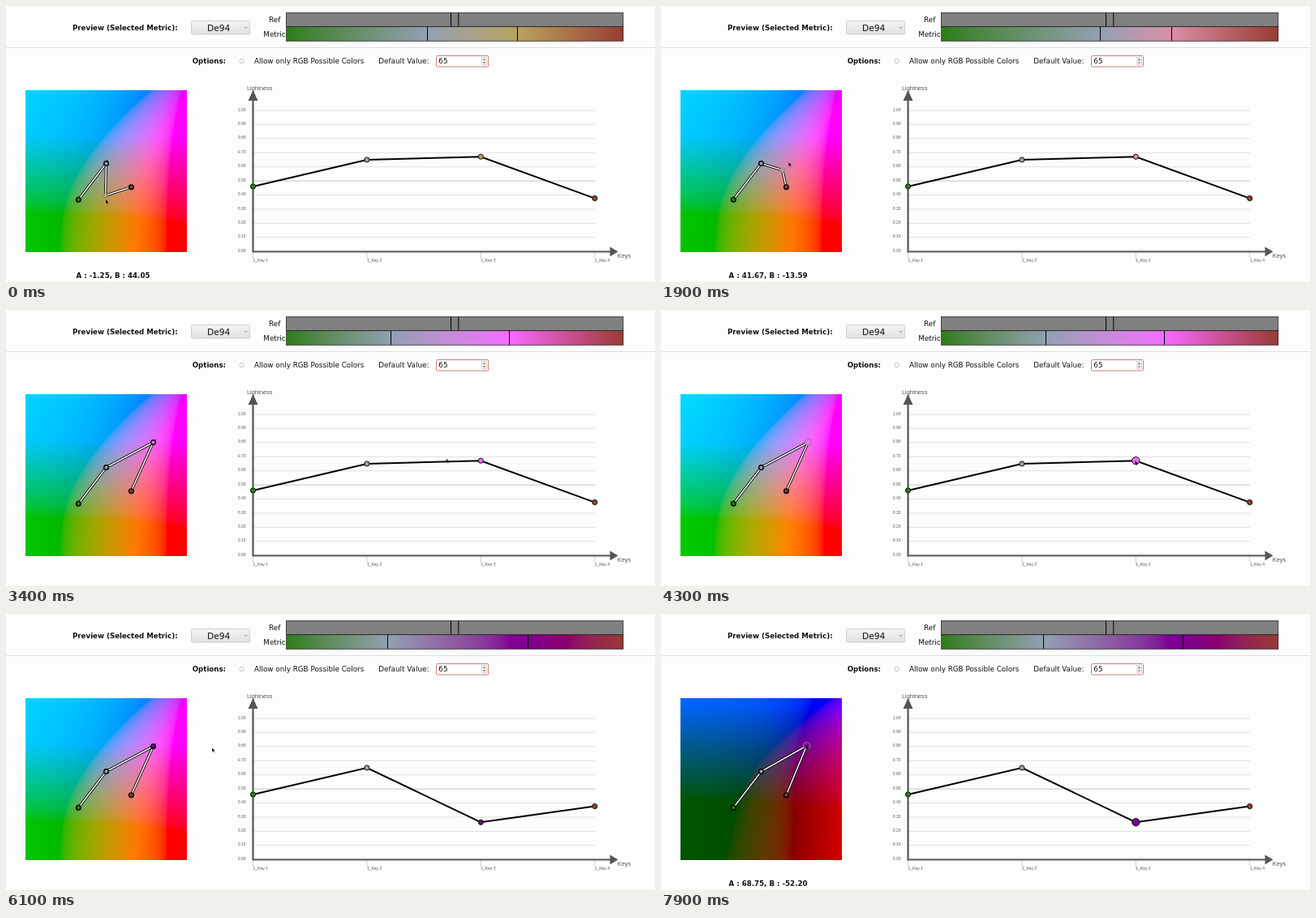
Write an HTML page with a canvas that moves like this. It is 800 px wide and 341 px high and loops after 8000 ms.

```html
<!DOCTYPE html>
<html lang="en">
<head>
<meta charset="utf-8">
<title>Colour path editor</title>
<style>
html, body { margin: 0; width: 100%; height: 100%; overflow: hidden; background: #fdfdfd; }
#stage { position: relative; width: 800px; height: 341px; overflow: hidden; }
canvas, svg { position: absolute; left: 0; top: 0; }
#plane { left: 24px; top: 104px; }
#bar { left: 346px; top: 26px; }
.ui { font: 8.8px "DejaVu Sans", sans-serif; fill: #111; }
.b { font: bold 8.67px "DejaVu Sans", sans-serif; fill: #111; }
.axis { font: 7.35px "Liberation Sans", Arial, sans-serif; fill: #555; }
.tick { font: 5px "Liberation Sans", Arial, sans-serif; fill: #555; }
</style>
</head>
<body>
<div id="stage">
  <canvas id="plane" width="199" height="200"></canvas>
  <canvas id="bar" width="415" height="17"></canvas>
  <svg width="800" height="341" viewBox="0 0 800 341">
    <defs>
      <linearGradient id="btn" x2="0" y2="1">
        <stop stop-color="#f4f4f4"/><stop offset="1" stop-color="#e0e0e0"/>
      </linearGradient>
    </defs>
    <path d="M0 51.5H800" stroke="#dcdcdc"/>
    <text class="b" x="82" y="30">Preview (Selected Metric):</text>
    <rect x="228.5" y="18.5" width="72" height="16.5" rx="1" fill="url(#btn)" stroke="#d0d0d0"/>
    <text class="ui" x="248" y="31" style="font-size:10.7px">De94</text>
    <path d="M293.8 25.8l1.8 1.7 1.8-1.7" fill="none" stroke="#666" stroke-width=".8"/>
    <text class="ui" x="324" y="20">Ref</text>
    <text class="ui" x="317.3" y="38">Metric</text>
    <rect x="345.5" y="8.3" width="415.3" height="17.2" fill="#808080" stroke="#222" stroke-width=".8"/>
    <path d="M548.5 8V25M557.8 8V25" stroke="#000"/>
    <rect x="345.5" y="25.5" width="415.3" height="17.8" fill="none" stroke="#222" stroke-width=".8"/>

    <text class="b" x="229.7" y="71.3">Options:</text>
    <rect x="288.3" y="65.8" width="4.6" height="4.6" rx="1" fill="#fff" stroke="#b5b5b5" stroke-width=".8"/>
    <text class="ui" x="306" y="71.3">Allow only RGB Possible Colors</text>
    <text class="ui" x="459.3" y="71.3">Default Value:</text>
    <rect x="530.5" y="61.5" width="64" height="13.5" rx="1" fill="#fff" stroke="#dc7b78"/>
    <text class="ui" x="533.3" y="71.3">65</text>
    <rect x="586.5" y="63.5" width="6" height="9.5" fill="#ececec" stroke="#ccc" stroke-width=".6"/>
    <path d="M588 67l1.5-1.7 1.5 1.7zM588 69.5l1.5 1.7 1.5-1.7z" fill="#666"/>

    <g id="grid"></g>
    <path d="M304.5 115V303.5H746" fill="none" stroke="#555" stroke-width="2.2"/>
    <path d="M304.5 104l6 13h-12zM754.5 303.5l-10-6v12z" fill="#555"/>
    <text class="axis" x="297" y="104">Lightness</text>
    <text class="axis" x="753.8" y="311">Keys</text>

    <g id="marks"></g>
    <g id="graph"></g>
    <g id="path"></g>
    <text id="readout" class="b" x="132" y="336.3" text-anchor="middle"></text>
    <path id="cursor" d="M0 0V4.6L1.1 3.7 1.9 5.4 2.7 5 2 3.4H3.4Z" fill="#000"/>
  </svg>
</div>
<script>
const LOOP = 8000, STEP = 100, LAG = 150, DEFAULT_L = 65;
const PLANE = { x: 24, w: 199, h: 200, cx: 124, cy: 204, unit: 1.25 };
const BAR = { x: 346, w: 415 };
const $ = id => document.getElementById(id);

// Pointer stops: time, x, y. Every leg eases in and out.
const STOPS = [
  [-150, 122.5, 234.3], [0, 123, 239.24], [1600, 146.3, 206.84],
  [2400, 181.5, 163.5], [2600, 183.7, 162.576], [3600, 584.5, 186.2],
  [4500, 584.5, 186.2], [5700, 586, 257.3], [6250, 180, 145],
  [6900, 178.3, 161.904], [7100, 181, 163], [7500, 181, 163], [7900, 179, 162.24]
];
const DROP = 2400, LIFT = [4500, 5700], REGRAB = 7500;

const clamp = (v, lo = 0, hi = 1) => Math.max(lo, Math.min(hi, v));
const mix = (a, b, k) => a.map((v, i) => v + (b[i] - v) * k);
const smooth = k => k * k * (3 - 2 * k);

function pointer(t) {
  const i = clamp(STOPS.findIndex(s => s[0] >= t), 1, STOPS.length - 1);
  const [a, b] = [STOPS[i - 1], STOPS[i]];
  return mix(a, b, smooth(clamp((t - a[0]) / (b[0] - a[0])))).slice(1);
}

// The dragged key trails the pointer.
function draggedSpot(t) {
  const [x, y] = pointer(Math.min(t - LAG, DROP));
  const from = pointer(REGRAB), to = pointer(Math.max(t, REGRAB));
  return [x + to[0] - from[0], y + to[1] - from[1]];
}
const lightY = l => 303.3 - l * 1.743;
const draggedLight = t => (303.3 - pointer(clamp(t - LAG, ...LIFT))[1]) / 1.743;

const invF = f => f > 6 / 29 ? f * f * f : (f - 16 / 116) / 7.787;
const gamma = v => 255 * (v <= .0031308 ? 12.92 * v : 1.055 * v ** (1 / 2.4) - .055);

function labToRgb([l, a, b]) {
  const fy = (l + 16) / 116;
  const x = .9505 * invF(fy + a / 500), y = invF(fy), z = 1.089 * invF(fy - b / 200);
  return [
    3.2406 * x - 1.5372 * y - .4986 * z,
    -.9689 * x + 1.8758 * y + .0415 * z,
    .0557 * x - .204 * y + 1.057 * z
  ].map(v => Math.round(gamma(clamp(v))));
}
const css = lab => `rgb(${labToRgb(lab)})`;
const toAB = (x, y) => [(x - PLANE.cx) * PLANE.unit, (y - PLANE.cy) * PLANE.unit];

// Colour difference with a hue term that weakens as chroma grows.
function distance([l1, a1, b1], [l2, a2, b2]) {
  const c1 = Math.hypot(a1, b1), c2 = Math.hypot(a2, b2), dc = c1 - c2;
  const hue = (a1 - a2) ** 2 + (b1 - b2) ** 2 - dc * dc;
  const weight = 1 + .0075 * Math.sqrt(c1 * c2);
  return Math.sqrt(2 * (l1 - l2) ** 2 + dc * dc + hue / weight ** 2);
}

function barStops(labs) {
  const sums = [0];
  for (let i = 1; i < labs.length; i++) sums.push(sums[i - 1] + distance(labs[i - 1], labs[i]));
  return sums.map(s => s / sums[sums.length - 1] * BAR.w);
}

const planeCtx = $('plane').getContext('2d');
let shownL = null;
function drawPlane(l) {
  if (l === shownL) return;
  shownL = l;
  const { w, h, x: left, cy } = PLANE, img = planeCtx.createImageData(w, h);
  for (let y = 0, p = 0; y < h; y++) {
    for (let x = 0; x < w; x++, p += 4) {
      img.data.set(labToRgb([l, ...toAB(left + x + .5, cy - h / 2 + y + .5)]), p);
      img.data[p + 3] = 255;
    }
  }
  planeCtx.putImageData(img, 0, 0);
}

const barCtx = $('bar').getContext('2d');
function drawBar(labs, stops) {
  for (let x = 0, i = 0; x < BAR.w; x++) {
    while (x > stops[i + 1]) i++;
    barCtx.fillStyle = css(mix(labs[i], labs[i + 1], (x - stops[i]) / (stops[i + 1] - stops[i])));
    barCtx.fillRect(x, 0, 1, 17);
  }
}

const line = (pts, color, w) =>
  `<polyline points="${pts.join(' ')}" fill="none" stroke="${color}" stroke-width="${w}"/>`;
const dot = ([x, y], r, fill, stroke, w) =>
  `<circle cx="${x}" cy="${y}" r="${r}" fill="${fill}" stroke="${stroke}" stroke-width="${w}"/>`;
const near = ([x1, y1], [x2, y2], r) => Math.hypot(x1 - x2, y1 - y2) < r;
const keyX = i => 304.5 + 140.4 * i;

function buildGrid() {
  let out = '';
  for (let i = 0; i <= 10; i++) {
    const y = lightY(i * 10);
    out += `<path d="M304.5 ${y}H726" stroke="${i === 5 ? '#c4c4c4' : '#e0e0e0'}"/>` +
      `<text class="tick" x="295.5" y="${y + .5}" text-anchor="end">${(i / 10).toFixed(2)}</text>`;
  }
  for (let i = 0; i < 4; i++) {
    out += `<path d="M${keyX(i)} 304V312" stroke="#ccc"/>` +
      `<text class="tick" x="${keyX(i)}" y="316">1_Key ${i + 1}</text>`;
  }
  $('grid').innerHTML = out;
}

function render(t) {
  const tip = pointer(t), light = draggedLight(t);
  const spots = [[89.3, 239.2], [123.5, 194.6], draggedSpot(t), [154.4, 223.7]];
  const lights = [46.1, 65, light, 37.7];
  const labs = spots.map((s, i) => [lights[i], ...toAB(...s)]);
  const fills = labs.map(css);
  const plotted = lights.map((l, i) => [keyX(i), lightY(l)]);

  const hover = near(tip, spots[2], 3.5) || near(tip, plotted[2], 5);
  const held = t < DROP + LAG || (t > LIFT[0] && t < LIFT[1]) || t > REGRAB;

  drawPlane(hover ? light : DEFAULT_L);
  const stops = barStops(labs);
  drawBar(labs, stops);
  $('marks').innerHTML = stops.slice(1, 3).map(s =>
    `<path d="M${Math.floor(BAR.x + s) + .5} 26V43" stroke="#000"/>`).join('');

  $('graph').innerHTML = line(plotted, '#000', 2) +
    plotted.map((p, i) => dot(p, i === 2 && hover ? 4.7 : 3.1, fills[i], '#111', 1)).join('');

  $('path').innerHTML = line(spots, '#000', 3.2) + line(spots, '#fff', 1.5) +
    spots.map((p, i) => i === 2 && (hover || held)
      ? dot(p, hover ? 4 : 2.6, fills[i], '#888', 1.1)
      : dot(p, 2.8, fills[i], '#000', 1.4)).join('');

  const [a, b] = toAB(...tip);
  const snapped = Math.round(a * 2.4) / 2.4;
  const inPlane = tip[0] >= PLANE.x && tip[0] <= PLANE.x + PLANE.w;
  $('readout').textContent = inPlane ? `A : ${snapped.toFixed(2)}, B : ${b.toFixed(2)}` : '';
  $('cursor').setAttribute('transform', `translate(${tip})`);
}

buildGrid();
const start = performance.now();
let last = -1;
function tick() {
  const t = Math.floor((performance.now() - start) % LOOP / STEP) * STEP;
  if (t !== last) render(last = t);
  requestAnimationFrame(tick);
}
tick();
</script>
</body>
</html>
```
